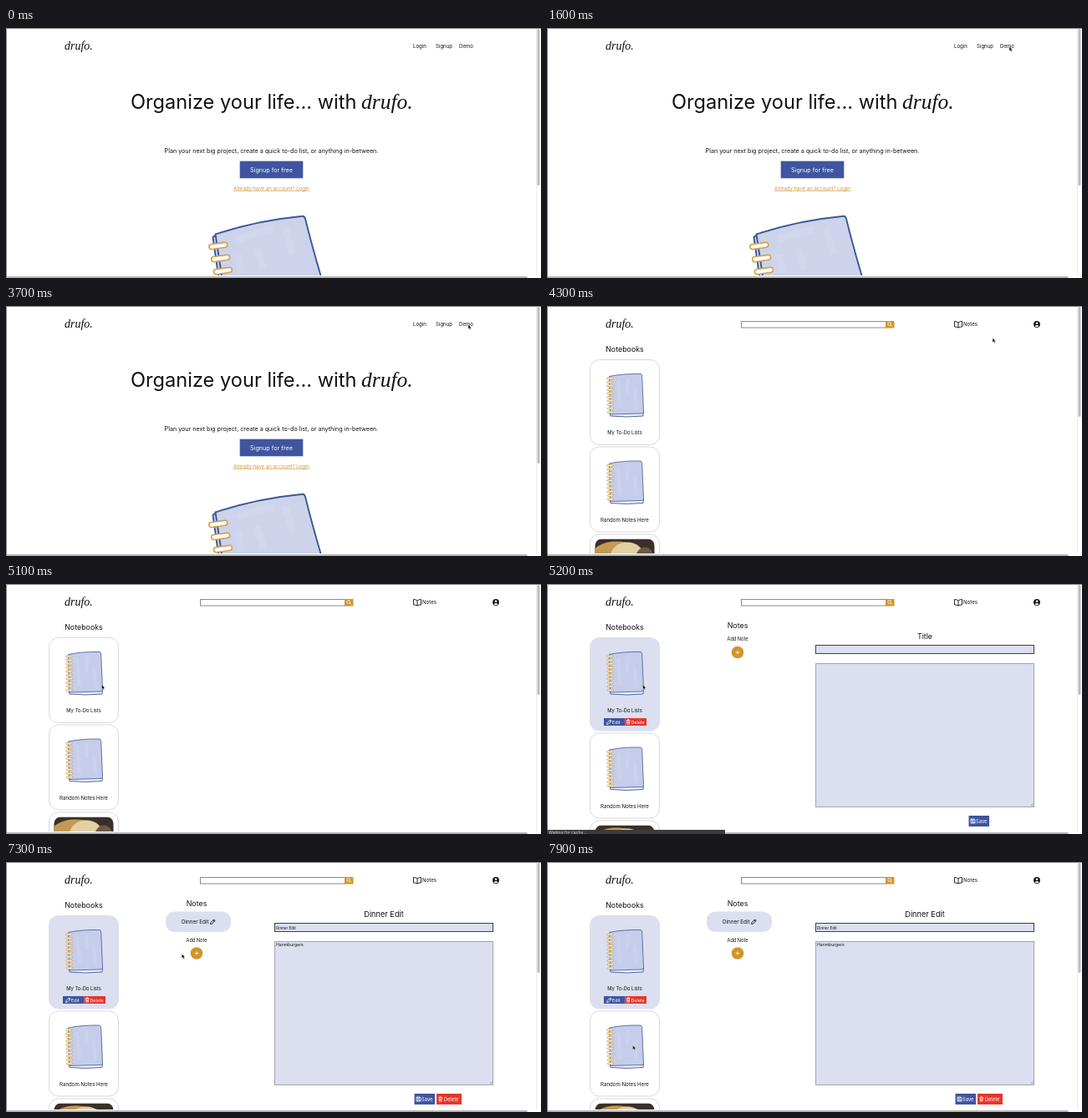
An HTML page that plays this animation: 640x300 px, repeating every 8000 ms.

```html
<!DOCTYPE html>
<html lang="en">
<head>
<meta charset="utf-8">
<title>Notebook app demo</title>
<style>
  html, body { margin: 0; height: 100%; overflow: hidden; background: #fff; }
  svg { display: block; width: 100%; height: 100%; }
  text { font-family: Inter, "Open Sans", sans-serif; font-size: 6.1px; fill: #111; }
  .mid { text-anchor: middle; }
  .head { font-size: 8.9px; text-anchor: middle; }
  .brand { font: italic 14px "Liberation Serif", serif; }
  .btn { fill: #fff; font-size: 5.8px; }
  .blue { fill: #3f559f; }
  .red { fill: #e8352a; }
  .gold { fill: #d0962c; }
  .tint { fill: #dbdfef; }
  .card { fill: #fff; stroke: #d9d9d9; }
  .line { fill: none; stroke: #111; }
  .white { fill: none; stroke: #fff; stroke-width: .8; }
</style>
</head>
<body>
<svg viewBox="0 0 640 300">
  <defs>
    <g id="book">
      <path d="M4 48 L5 52 Q24 54 44 52 L44.500 47" fill="#eef0f8" stroke="#51689f" stroke-width="1"/>
      <path d="M3.500 4.500 Q20 1 41 1.500 Q42.500 2 42.700 4 L44.500 47 Q44.500 49 42 49 L4.500 50 Z" fill="#c5cdea" stroke="#51689f" stroke-width=".9"/>
      <path d="M14 9 L17 42 M26 6 L25 25 M34 20 L36 44" fill="none" stroke="#d0d7ef" stroke-width="4" opacity=".5"/>
      <g id="rings" fill="#fff" stroke="#d0a040" stroke-width=".8"></g>
    </g>
    <path id="pencil" d="M0 6 L.6 4 L4.200 .4 L5.700 1.900 L2 5.500 Z M3.300 1.300 L4.800 2.800"/>
    <g id="trash" class="white">
      <path d="M0 1 H4.400 M1.500 1 V.2 H2.900 V1 M.6 1 L.9 5.600 H3.500 L3.800 1 M1.700 2.200 V4.600 M2.700 2.200 V4.600" stroke-width=".7"/>
    </g>
    <clipPath id="photo"><rect x="6.500" y="6" width="71" height="60" rx="8"/></clipPath>
  </defs>
  <rect width="640" height="300" fill="#fff"/>

  <text class="brand" x="70" y="26">drufo.</text>

  <g data-t="0 3800">
    <text x="487" y="24.200">Login</text>
    <text x="514" y="24.200">Signup</text>
    <text x="542" y="24.200">Demo</text>
    <text x="149" y="96.500" style="font-size:23.6px">Organize your life... with</text>
    <text class="brand" x="425" y="96.500" style="font-size:25.500px">drufo.</text>
    <text class="mid" x="317.500" y="149.800" style="font-size:7.18px">Plan your next big project, create a quick to-do list, or anything in-between.</text>
    <rect class="blue" x="279.700" y="159.700" width="75.600" height="20.600"/>
    <text class="mid" x="317.500" y="172.600" style="font-size:7.2px;fill:#fff">Signup for free</text>
    <text class="mid" x="317.500" y="194.500" style="font-size:6.03px;fill:#d0993c" text-decoration="underline">Already have an account? Login</text>
    <path d="M248 251 L255 297 H376 L358 229 Q357 225 353 226 Q300 231 250 247.500 Z" fill="#ccd3ea"/>
    <path d="M276 254 Q300 245 320 242 M278 272 L282 294 M334 240 L343 272 M300 264 L308 290" stroke="#d8def1" stroke-width="9" fill="none" opacity=".4"/>
    <path d="M258 297 L250.500 247.500 Q300 231 353 226 Q357 225 358 229 Q367 265 376.500 297 M250 249 L247.500 251 L254 297" fill="none" stroke="#3d5797" stroke-width="1.900"/>
    <g id="bigRings" fill="#fff" stroke="#d3a24a" stroke-width="1.600"></g>
  </g>

  <g data-t="3800 8000">
    <rect x="232.500" y="18.500" width="173" height="7.500" fill="#fff" stroke="#8a8a8a"/>
    <rect class="gold" x="405" y="18" width="10.500" height="8.500"/>
    <path class="white" d="M411.200 22.800 L413 24.800"/>
    <circle class="white" cx="409.700" cy="21.500" r="1.900"/>
    <path class="line" d="M492 20 Q490 18.300 487.500 18.500 V25 Q490 24.800 492 26 Q494 24.800 496.500 25 V18.500 Q494 18.300 492 20 V26" stroke-width=".9"/>
    <text x="498" y="24.200">Notes</text>
    <circle cx="586" cy="22" r="3.900" fill="#111"/>
    <circle cx="586" cy="20.800" r="1.300" fill="#fff"/>
    <path d="M583.500 24.200 Q586 21.600 588.500 24.200 Q586 26.200 583.500 24.200" fill="#fff"/>
    <text class="head" x="93" y="55.200">Notebooks</text>

    <g transform="translate(51 64)">
      <rect class="card" x=".5" y=".5" width="83" height="102" rx="11" data-t="3800 5200"/>
      <rect class="tint" width="84" height="112.500" rx="12" data-t="5200 8000"/>
      <use href="#book" x="20" y="16"/>
      <text class="mid" x="42" y="90" style="font-size:5.8px">My To-Do Lists</text>
      <g data-t="5200 8000">
        <rect class="blue" x="17" y="97" width="25.500" height="9"/>
        <rect class="red" x="42.500" y="97" width="25.500" height="9"/>
        <use href="#pencil" x="20.500" y="98.500" class="white"/>
        <text class="btn" x="27" y="103.500" style="font-size:5.4px">Edit</text>
        <use href="#trash" x="44" y="98.500"/>
        <text class="btn" x="49.500" y="103.500" style="font-size:5.3px">Delete</text>
      </g>
    </g>
    <g id="lower">
      <g transform="translate(51 168.500)">
        <rect class="card" x=".5" y=".5" width="83" height="102" rx="11"/>
        <use href="#book" x="20" y="16"/>
        <text class="mid" x="42" y="90">Random Notes Here</text>
      </g>
      <g transform="translate(51 273.500)">
        <rect class="card" x=".5" y=".5" width="83" height="102" rx="11"/>
        <g clip-path="url(#photo)">
          <rect x="6" y="6" width="72" height="60" fill="#3a302a"/>
          <ellipse cx="32" cy="27" rx="30" ry="18" fill="#c39a55"/>
          <ellipse cx="45" cy="27" rx="20" ry="17" fill="#e3cfa4"/>
          <ellipse cx="66" cy="30" rx="11" ry="14" fill="#6b5a48"/>
        </g>
      </g>
    </g>
  </g>

  <g data-t="5200 8000">
    <text class="head" x="228" y="53.200">Notes</text>
    <g data-t="5400 8000">
      <rect class="card" x="191.500" y="60" width="77" height="23.500" rx="10" data-t="5400 6600"/>
      <rect class="tint" x="191" y="59.500" width="78" height="24.500" rx="10.500" data-t="6600 8000"/>
      <text x="210" y="73.700" style="font-size:6.3px">Dinner Edit</text>
      <use href="#pencil" x="244.500" y="68.500" class="line" stroke-width=".9"/>
      <circle id="ring" class="line" cx="248.200" cy="71.800" r="10.300" stroke-width="1.300"/>
    </g>
    <g id="add">
      <text class="mid" x="228" y="68" style="font-size:5.6px">Add Note</text>
      <circle class="gold" cx="228" cy="82" r="7.300"/>
      <path class="white" d="M225.700 82 H230.300 M228 79.700 V84.300"/>
    </g>
    <text class="head" x="452" y="66.200" data-t="5200 6700">Title</text>
    <rect class="tint" x="321.500" y="73.500" width="261" height="10" stroke="#3c3f48"/>
    <rect class="tint" x="321.500" y="95.500" width="261" height="172" stroke="#a3a5ad"/>
    <path d="M579 266 L581.500 263.500 M580.500 266 L581.500 265" stroke="#777" stroke-width=".6"/>
    <g data-t="6700 8000">
      <text class="head" x="452" y="66.200" style="font-size:9.2px">Dinner Edit</text>
      <text x="323" y="80.600" style="font-size:4.6px">Dinner Edit</text>
      <text x="323" y="101" style="font-size:5.1px">Hanmburgers</text>
      <rect class="red" x="515" y="278" width="30" height="13"/>
      <use href="#trash" x="517.500" y="281.500"/>
      <text class="btn" x="523.800" y="286.600">Delete</text>
    </g>
    <g id="save">
      <rect class="blue" x="504.500" y="278" width="24.500" height="13"/>
      <path class="white" d="M507 282 H511 L512 283 V287 H507 Z M508 282 V283.700 H510.500 V282 M508.300 287 V285.300 H510.700 V287" stroke-width=".7"/>
      <text class="btn" x="513" y="286.600">Save</text>
    </g>
  </g>

  <rect y="297" width="640" height="3" fill="#fff"/>
  <rect y="298" width="623.500" height="2" fill="#b4b4b4"/>
  <path d="M634.500 0 V298" stroke="#ececec"/>
  <rect id="thumb" x="635.500" y="1" width="3" rx="1.500" fill="#bdbdbd"/>
  <path d="M.5 300 V.5 H640" fill="none" stroke="#888"/>
  <g data-t="5200 5400">
    <rect y="295" width="213" height="5" fill="#3b3b3b"/>
    <text x="2" y="299.800" style="font-size:5px;fill:#ddd">Waiting for cache...</text>
  </g>
  <g data-t="6400 6700" opacity=".4">
    <rect y="295" width="72" height="5" fill="#999"/>
    <text x="2" y="299.800" style="font-size:5px">Waiting for cache...</text>
  </g>

  <g id="cursor">
    <path id="arrow" d="M0 0 V5.200 L1.300 4.100 L2.200 6.100 L3.200 5.700 L2.300 3.700 H4 Z" fill="#000" stroke="#fff" stroke-width=".4"/>
    <path id="hand" d="M0 0 Q1 -.5 1.200 .5 V2.500 L3.600 3 Q4.200 3.300 4 4.500 L3.300 6.500 H.5 L-1.300 4 L0 4 Z" fill="#fff" stroke="#000" stroke-width=".7"/>
  </g>
</svg>
<script>
const LOOP = 8000, STEP = 100;
const $ = id => document.getElementById(id);

// Pointer stops: time, x, y
const stops = [
  [100, 630, 150], [900, 556, 54], [1500, 553, 22.5], [4200, 553, 22.5],
  [4300, 533, 38.5], [5100, 114.500, 121], [6000, 114.500, 121],
  [6400, 248, 72], [7000, 248, 72], [7900, 102.500, 220]
];

const pill = (x, y, w, h, turn) =>
  `<rect x="${x}" y="${y}" width="${w}" height="${h}" rx="${h / 2}" transform="rotate(${turn} ${x} ${y})"/>`;
for (let i = 0; i < 10; i++)
  $("rings").innerHTML += pill(0.5 + i * 0.08, 6 + i * 4.5, 7.5, 2, -3);
for (let i = 0; i < 3; i++)
  $("bigRings").innerHTML += pill(242.5 + i * 2.8, 260 + i * 15, 22, 6, -8);

const timed = [...document.querySelectorAll("[data-t]")].map(el => [el, ...el.dataset.t.split(" ").map(Number)]);
const show = (el, on) => { el.style.display = on ? "" : "none"; };
const move = (el, x, y) => el.setAttribute("transform", `translate(${x} ${y})`);

function pointer(t) {
  const i = stops.findIndex(s => s[0] > t);
  if (i < 0) return stops.at(-1).slice(1);
  if (i === 0) return stops[0].slice(1);
  const [t0, x0, y0] = stops[i - 1], [t1, x1, y1] = stops[i];
  const u = (t - t0) / (t1 - t0), k = u * u * (3 - 2 * u);
  return [x0 + (x1 - x0) * k, y0 + (y1 - y0) * k];
}

function draw(now) {
  const t = Math.floor(now % LOOP / STEP) * STEP;
  for (const [el, from, to] of timed) show(el, t >= from && t < to);
  move($("lower"), 0, t >= 5200 ? 10 : 0);
  move($("add"), 0, t >= 5400 ? 27.5 : 0);
  move($("save"), t >= 6700 ? -16 : 0, 0);
  $("thumb").setAttribute("height", t < 3800 ? 188 : 132);

  const [x, y] = pointer(t);
  const hover = Math.hypot(x - 248, y - 72) < 10;
  move($("cursor"), x, y);
  show($("cursor"), t >= 100);
  show($("arrow"), !hover);
  show($("hand"), hover);
  show($("ring"), hover);
  requestAnimationFrame(draw);
}
requestAnimationFrame(draw);
</script>
</body>
</html>
```
